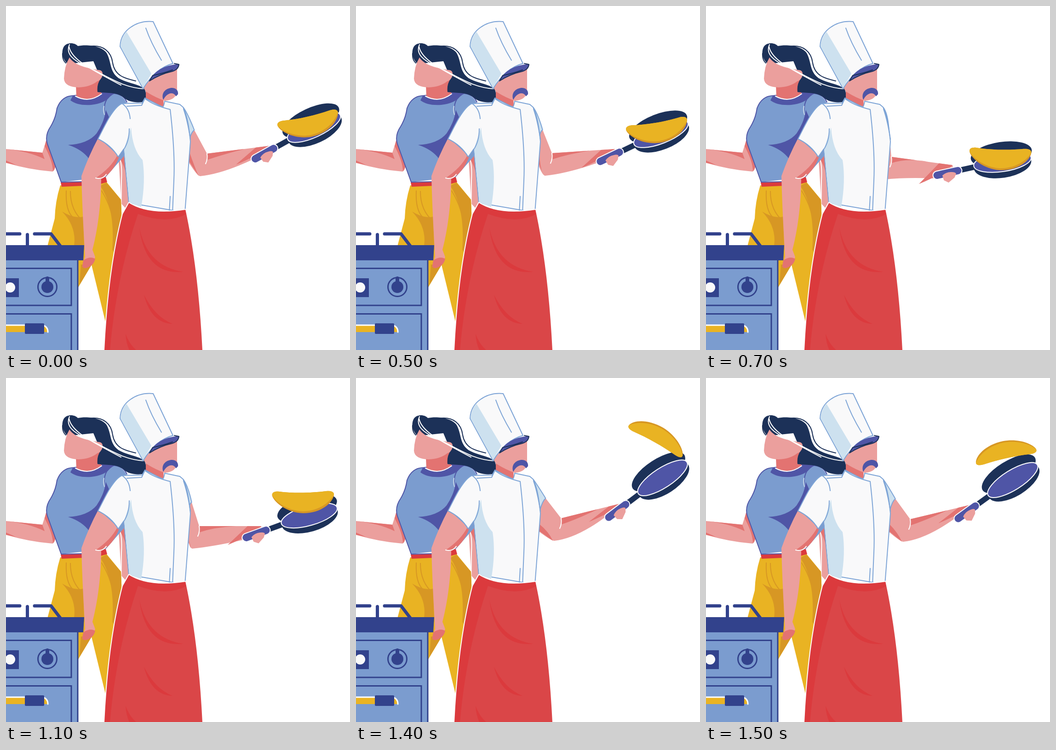
These frames come from a looping animation (748 by 748 pixels, 1600 ms). An HTML page:

```html
<!DOCTYPE html>
<html lang="en">
<head>
<meta charset="utf-8">
<title>Two cooks</title>
<style>
  html, body { margin: 0; width: 100%; height: 100%; overflow: hidden; background: #fff; }
  svg { display: block; width: 100vw; height: 100vh; }
  .skin { fill: #eb9f9d } .blush { fill: #e37371 }
  .navy { fill: #1c3158 } .violet { fill: #4f55a6 } .royal { fill: #32428c }
  .blue { fill: #7b9ccf } .ice { fill: #cde1ef } .cloth { fill: #f9f9fa }
  .gold { fill: #e9b323 } .ochre { fill: #d79724 }
  .red { fill: #db3a3d } .rose { fill: #da4648 } .white { fill: #fff }
  .line { fill: none; stroke-linecap: round; stroke-linejoin: round; stroke-width: 2 }
  .edge { stroke: #7da4d6; stroke-width: 2; stroke-linejoin: round }
  .wl { stroke: #fff } .nl { stroke: #1c3158 } .bl { stroke: #7da4d6 }
  .rl { stroke: #32428c; stroke-width: 3 } .ol { stroke: #d79724 }
</style>
</head>
<body>
<svg viewBox="0 0 748 748">
  <g id="woman">
    <path class="skin" d="M0 311 L79 319 L88 291 L108 345 Q107 358 101 360 Q50 356 0 341Z"/>
    <path class="blush" d="M0 311 L79 319 L84 333 Q50 316 0 311Z M87 293 L107 350 L102 360 Q102 338 84 305Z M0 336 Q12 341 22 346 L0 341Z"/>
    <path class="skin" d="M244 320 L275 300 L275 430 L262 442 L251 430Z"/>
    <path class="blush" d="M244 328 L262 310 L262 372 Q258 345 244 328Z"/>
    <path class="line wl" d="M246 330 Q253 340 251 380 L250 470"/>

    <path class="gold" d="M118 390 L218 382 L250 421 L252 470 L217 690 L186 563 L157 612 L80 560 L106 462 Q107 425 118 390Z"/>
    <path class="ochre" d="M205 391 Q238 440 231 530 L238 543 L251 450 L250 421 L218 384Z M122 447 Q148 463 168 458 L170 530 L148 522 Q154 480 122 447Z M163 562 L186 563 L160 606Z"/>
    <path class="line ol" d="M131 402 Q129 445 146 460 M140 403 Q140 445 168 468 M208 402 Q232 440 236 490"/>
    <path class="red" d="M119 384 L168 382 V391 L121 393Z M205 372 L216 368 L220 383 L205 387Z"/>

    <path class="blue" d="M147 195 Q121 196 111 222 Q108 244 97 262 Q84 281 90 300 L120 383 L217 372 L262 320 L262 210 Q250 187 222 188Z"/>
    <path class="violet" d="M135 302 Q178 300 197 277 Q214 252 217 226 L226 246 L200 291 L181 333 Q166 312 135 302Z"/>
    <path class="line" stroke="#4f55a6" d="M145 195 Q121 196 111 222 Q108 244 97 262 Q84 281 90 300 L120 383 L168 382 M235 190 Q255 192 263 209 M214 236 Q210 200 235 190"/>
    <path class="line" stroke="#cde1ef" d="M214 236 Q211 226 213 218"/>
    <path class="violet" d="M146 194 L140 205 Q155 217 185 215 Q214 212 226 197 L236 189 L215 186Z"/>
    <path class="blush" d="M152 172 L153 197 Q180 209 208 192 L203 150Z"/>
    <path class="line wl" d="M151 196 Q180 212 208 191"/>

    <path class="navy" d="M134 126 C121 114 120 98 126 88 C134 78 150 80 156 87 C175 83 206 86 218 101 C230 120 224 142 245 157 C264 168 284 168 302 180 L308 207 C290 211 268 211 256 199 C240 186 215 190 199 187 Q197 170 206 158 L190 120Z"/>
    <path class="line nl" d="M180 88 C212 83 229 100 232 124 C237 154 262 158 282 163 M123 103 Q122 117 130 124"/>
    <path class="skin" d="M138 112 C150 130 178 135 200 139 Q211 139 210 150 Q208 160 198 164 Q183 176 158 177 Q127 176 126 158 Q127 130 138 112Z"/>
    <path class="line wl" d="M138 84 C129 104 146 118 174 131 C222 153 252 177 299 180 M137 88 C142 118 190 140 250 172"/>
  </g>

  <g id="arm">
    <path class="skin" id="limb"/>
    <path class="blush" id="shade"/>
    <path class="line wl" id="crease"/>
    <path class="ice edge" id="sleeve"/>
  </g>

  <g id="man">
    <path class="skin" d="M201 286 Q180 325 164 370 Q166 450 172 545 L166 566 Q174 574 186 562 L194 546 L188 530 Q206 460 207 376 Q230 362 245 326Z"/>
    <path class="blush" d="M168 553 Q184 543 194 550 Q190 566 173 570 Q166 570 166 565Z M195 374 Q228 352 242 325 L246 328 Q232 364 207 376Z"/>
    <path class="line wl" d="M195 374 Q210 378 218 366"/>

    <path class="blush" d="M304 180 L342 190 L343 219 L304 207Z"/>
    <path class="skin" d="M314 158 L372 136 V184 Q370 205 345 206 Q325 199 306 187 Q297 180 301 170Z"/>
    <path class="violet" d="M342 204 C336 187 350 178 361 178 C375 179 377 191 371 199 C365 184 350 188 342 204Z"/>
    <path class="white" d="M369 197 L376 190 V206 L362 206Z"/>
    <path class="cloth edge" d="M248 88 Q249 62 270 47 Q292 31 320 34 L363 125 Q325 135 298 180Z"/>
    <path class="ice" d="M249 88 Q251 68 262 56 L316 147 L298 178Z"/>
    <path class="line bl" d="M304 48 Q315 80 338 118"/>
    <path class="violet" d="M312 162 Q328 130 376 126 Q377 138 362 142 Q335 149 312 162Z"/>
    <path class="line nl" d="M366 125 L376 127 Q375 138 362 142 Q335 148 312 163 L319 151 Q340 147 362 139"/>

    <path class="cloth edge" d="M302 200 L296 211 L252 212 C232 221 214 262 200 289 Q228 302 244 328 L256 311 L267 428 L389 449 L401 295 Q396 240 385 220 L378 214 L345 207 Q344 215 341 220Z"/>
    <path class="ice" d="M272 264 Q275 312 297 335 Q304 380 294 437 L268 428 L257 310Z"/>
    <path class="line bl" d="M252 212 Q268 222 270 245 M268 267 Q268 294 256 312 M263 218 L295 216 L302 201 Q320 216 357 225 Q368 320 365 380 L362 450 M357 414 L355 449 M386 224 Q395 250 401 290"/>

    <path class="rose" d="M267 427 Q310 455 391 442 Q419 570 428 748 H213 Q222 570 253 452Z"/>
    <path class="red" d="M267 427 Q310 455 391 442 L393 452 Q350 476 287 452 Q240 590 226 748 H213 Q222 570 253 452Z M290 483 Q308 566 385 578 Q304 586 290 483Z M300 628 Q324 676 362 691 Q316 690 300 628Z M260 713 Q268 735 283 748 H268 Q261 732 260 713Z"/>
    <path class="line wl" d="M213 748 Q222 570 253 452 L267 427 Q310 455 391 442 Q419 570 428 748"/>
  </g>

  <g id="stove">
    <path class="line rl" style="stroke-width:7" d="M-5 495.500 H30 M46.500 497 V520 M62 495.500 H98 L119 523"/>
    <path class="blue" d="M0 553 H156 V748 H0Z"/>
    <path class="royal" d="M0 520 H170 L168 553 H0Z"/>
    <path class="line rl" style="stroke-linecap:butt;stroke-linejoin:miter" d="M156 553 V748 M-5 570.500 H142 V651 H-5 M-5 669.500 H142 V755"/>
    <path class="royal" d="M0 592 H28 V633 H0Z M86 590 Q90 586 94 590 V612 H86Z"/>
    <circle class="cloth" cx="9" cy="612" r="11"/>
    <circle class="line rl" cx="90" cy="611" r="20.500"/>
    <circle class="royal" cx="90" cy="611" r="13"/>
    <path class="gold" d="M0 694 H83 Q91 697 91 709 H0Z"/>
    <path class="line wl" style="stroke-width:3" d="M-4 694 H78 Q91 696 91 709"/>
    <rect class="royal" x="41" y="690" width="42" height="23" rx="2"/>
  </g>

  <g id="pan">
    <rect class="navy" x="26" y="-6" width="42" height="12"/>
    <g class="navy">
      <ellipse cx="123" cy="-14" rx="67" ry="27" transform="rotate(4 123 -14)"/>
      <ellipse cx="121" cy="8" rx="63" ry="29" transform="rotate(4 121 8)"/>
    </g>
    <ellipse class="violet wl" stroke-width="2" cx="122" cy="2" rx="63" ry="21.500" transform="rotate(4 122 2)"/>
    <rect class="violet wl" stroke-width="2" x="-32" y="-9" width="64" height="18" rx="9"/>
    <path class="skin" d="M-12 3 Q-2 -3 9 0 Q18 2 18 6 L13 13 L-2 21 L-11 14Z"/>
  </g>

  <g id="cake">
    <path class="ochre" d="M-67 -6 C-69 -14 -62 -17 -52 -16 C-20 -12 20 -13 50 -17 C60 -18 68 -16 67 -8 C64 8 40 31 0 31 C-35 30 -62 8 -67 -6Z"/>
    <path class="gold" d="M-67 -7 C-69 -14 -62 -17 -52 -16 C-20 -12 20 -13 50 -17 C60 -18 68 -16 67 -9 C60 4 38 26 0 27 C-35 26 -60 5 -67 -7Z"/>
  </g>
</svg>
<script>
  const LOOP = 1600;

  // start ms, grip x y, pan angle, elbow x y, pancake x y angle thickness
  const poses = [
    [0,    562, 321, -29,   437, 321, 658, 254, -12,  1],
    [500,  552, 328, -25.5, 426, 320, 655, 267, -9,   1],
    [600,  538, 347, -19,   414, 324, 648, 297, -4,   1],
    [700,  525, 363, -12.5, 403, 328, 640, 326, 2,    1],
    [1100, 544, 339, -20,   420, 322, 646, 263, 0,    1],
    [1200, 556, 313, -30,   431, 314, 649, 166, -50,  .85],
    [1300, 563, 298, -34,   439, 309, 654, 131, -100, .8],
    [1400, 568, 289, -37,   446, 305, 655, 130, -150, .82],
    [1500, 567, 292, -36,   444, 307, 651, 163, -192, .85]
  ];

  const el = id => document.getElementById(id);
  const draw = (id, d) => el(id).setAttribute('d', d);
  const place = (id, value) => el(id).setAttribute('transform', value);

  function setPose([, gx, gy, angle, ex, ey, cx, cy, spin, thick]) {
    const wx = gx + 11, wy = gy - 17;   // top of the wrist
    const bx = ex - 18, by = ey + 49;   // underside of the elbow
    const sx = 398 + (ex - 403) / 3, sy = ey / 2 + 109;   // cuff
    const along = k => `${ex + (wx - ex) * k} ${ey + (wy - ey) * k}`;

    draw('limb', `M385 255 L${sx} ${sy} L${ex} ${ey} L${wx} ${wy} L${gx + 14} ${gy - 4}
      L${gx - 24} ${gy + 12} Q${bx + 52} ${by - 5} ${bx + 3} ${by} Q${bx - 4} ${by} 390 328Z`);
    draw('shade', `M${ex} ${ey} L${along(.6)} Q${ex + 35} ${ey + 2} ${ex - 1} ${ey + 14}Z
      M${wx} ${wy} L${along(.78)} L${gx - 62} ${gy + 24} Q${gx - 35} ${gy + 13} ${gx} ${gy - 6}Z
      M392 328 L${bx} ${by} Q${bx - 9} ${by - 20} 399 318Z`);
    draw('crease', `M${ex} ${ey} Q${ex + 2} ${ey + 12} ${ex - 3} ${ey + 22}`);
    draw('sleeve', `M386 221 Q396 235 ${sx} ${sy} Q${sx - 7} ${sy + 6} 400 287 L388 250Z`);
    place('pan', `translate(${gx} ${gy}) rotate(${angle})`);
    place('cake', `translate(${cx} ${cy}) rotate(${spin}) scale(1 ${thick})`);
  }

  function tick() {
    const t = performance.now() % LOOP;
    setPose(poses.findLast(p => p[0] <= t));
    requestAnimationFrame(tick);
  }
  tick();
</script>
</body>
</html>
```
